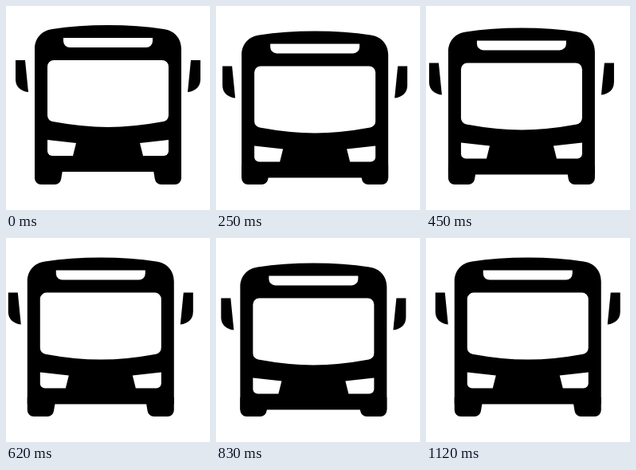
Animation of 256 by 256 pixels, one loop 1160 ms. Source, as an HTML page:

```html
<!DOCTYPE html>
<html lang="en">
<head>
<meta charset="utf-8">
<title>Bus</title>
<style>
  html, body { margin: 0; height: 100%; overflow: hidden; background: #fff; }
  svg { display: block; width: 100vw; height: 100vh; }
</style>
</head>
<body>
<svg viewBox="0 0 256 256">
  <defs>
    <path id="wheel" d="M36 200V216a8 8 0 0 0 8 8H61.3a8 8 0 0 0 7.9-6.9L72 200z"/>
    <path id="mirror" d="M12 68H24L28 108C18 107 12 101 12 92z"/>
    <path id="lamp" fill="#fff" d="M52 168L88 172L84 188H58a6 6 0 0 1-6-6z"/>
  </defs>
  <g id="wheels">
    <use href="#wheel"/>
    <use href="#wheel" transform="translate(256) scale(-1 1)"/>
  </g>
  <g id="bus">
    <path d="M36 54C36 40 45 31 58 29Q90 24 128 24Q166 24 198 29C211 31 220 40 220 54V208H36z"/>
    <g fill="#fff">
      <path d="M72 40H184V44a8 8 0 0 1-8 8H80a8 8 0 0 1-8-8z"/>
      <path d="M60 68H196a8 8 0 0 1 8 8V137.2a8 8 0 0 1-6.7 7.9Q160 152 128 152Q96 152 58.7 145.1a8 8 0 0 1-6.7-7.9V76a8 8 0 0 1 8-8z"/>
    </g>
    <use href="#lamp"/>
    <use href="#mirror"/>
    <g transform="translate(256) scale(-1 1)">
      <use href="#lamp"/>
      <use href="#mirror"/>
    </g>
  </g>
</svg>
<script>
  const LOOP = 1160;
  const bus = document.getElementById('bus');
  const wheels = document.getElementById('wheels');

  // 0 -> 1 -> 0 over one period, gently eased at both ends
  function swing(t, period) {
    const p = (t % period) / period;
    const u = 1 - Math.abs(1 - 2 * p);
    return 0.3 * u + 0.35 * (1 - Math.cos(Math.PI * u));
  }

  function draw(now) {
    const x = -9.5 * swing(now, LOOP);
    const y = 8 * swing(now, LOOP / 2);
    bus.setAttribute('transform', `translate(${x} ${y})`);
    wheels.setAttribute('transform', `translate(${x} 0)`);
  }

  const start = performance.now();
  function tick() {
    draw(performance.now() - start);
    requestAnimationFrame(tick);
  }
  tick();
</script>
</body>
</html>
```
